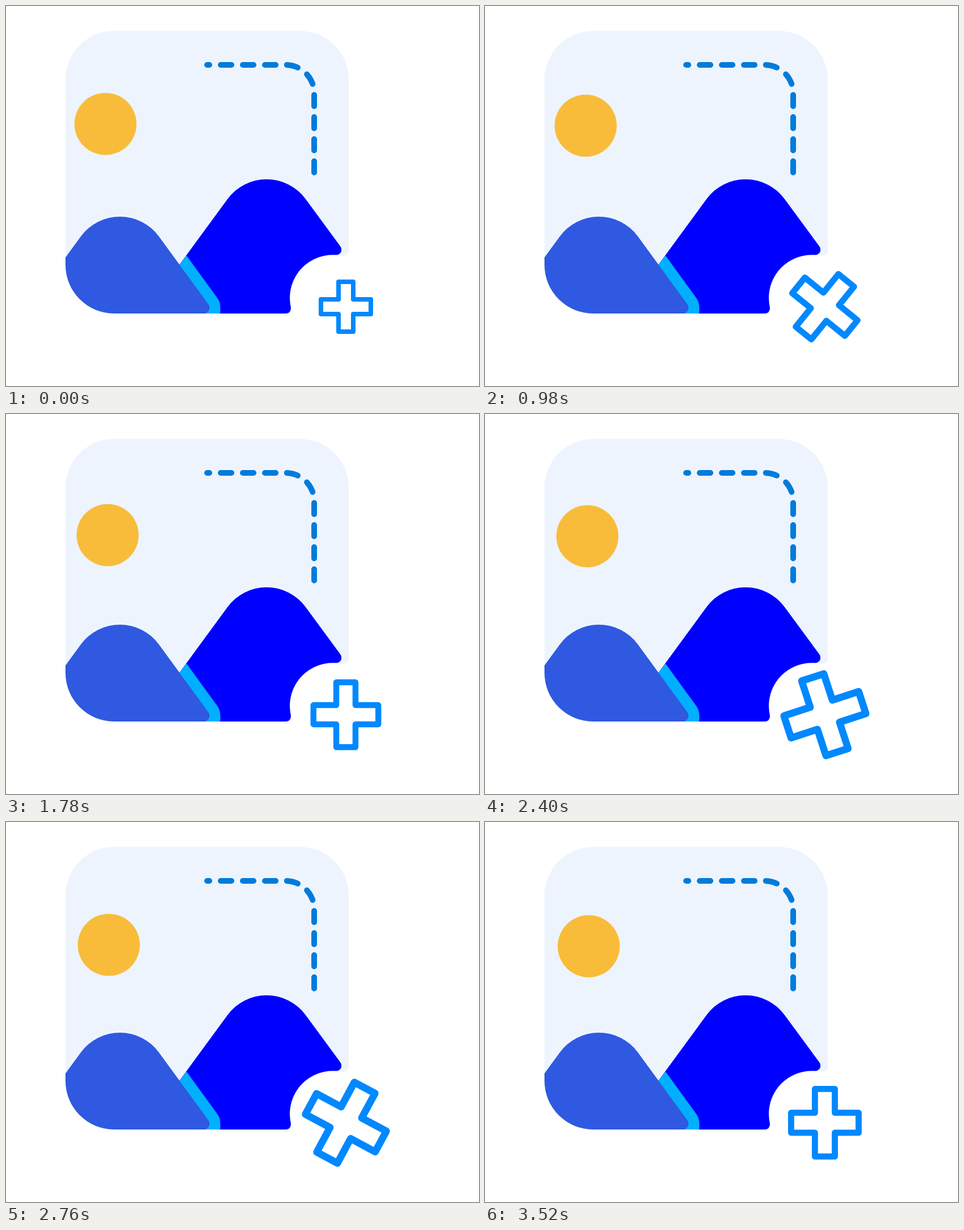
Animation, 835 px wide and 671 px high, one loop 3.6 s. Source, as an HTML page with a canvas:

```html
<!DOCTYPE html>
<html lang="en">
<head>
<meta charset="utf-8">
<title>Add picture</title>
<style>
html, body { margin: 0; width: 100%; height: 100%; overflow: hidden; background: #fff; }
canvas { display: block; }
</style>
</head>
<body>
<canvas id="stage" width="835" height="671"></canvas>
<script>
const ctx = document.getElementById('stage').getContext('2d');
const LOOP = 3600, LAST = 3520, STEP = 20;
const linear = u => u;
const sine = u => (1 - Math.cos(Math.PI * u)) / 2;

// [time, value] keys for the plus sign
const TURN = [[0, 0], [600, 87], [980, 129], [1400, 180], [1840, 180], [3240, 360]];
const SIZE = [[0, 1], [120, 1.03], [540, 0.66], [890, 1.365], [1400, 1.302],
  [1840, 1.302], [2600, 1.63], [3240, 1.354]];

function track(keys, t, ease) {
  for (let i = 1; i < keys.length; i++) {
    const [t0, a] = keys[i - 1], [t1, b] = keys[i];
    if (t <= t1) return a + (b - a) * ease((t - t0) / (t1 - t0));
  }
  return keys[keys.length - 1][1];
}

function fill(color, path) {
  ctx.fillStyle = color;
  ctx.fill(path);
}

const card = new Path2D(`M105 130A86 86 0 0 1 191 44H519A86 86 0 0 1 605 130V431
  Q605 441 595 441L577 439A76 76 0 0 0 501 515L503 533L493 543H191A86 86 0 0 1 105 457Z`);
const bigHill = new Path2D(`M306 457L391 341A85.5 85.5 0 0 1 529 341L590 424
  C595 431 591 440 582 439.5H577A76 76 0 0 0 501 515Q501 524 503 533
  Q503 543 493 543H340Z`);
const band = new Path2D('M306 457L318.5 440.5L374 517Q380 526 378 543H340Z');
const smallHill = new Path2D(`M105 444L132 407A85.5 85.5 0 0 1 270 407L357.5 527
  C362 534 357 543 349 543H191A86 86 0 0 1 105 457Z`);

function drawDashes() {
  ctx.strokeStyle = '#007bdb';
  ctx.lineWidth = 10;
  ctx.lineCap = 'round';
  ctx.beginPath();
  const line = (x0, y0, x1, y1) => { ctx.moveTo(x0, y0); ctx.lineTo(x1, y1); };
  const bend = (from, to) => {
    const a = from * Math.PI / 180;
    ctx.moveTo(494 + 50 * Math.cos(a), 154 + 50 * Math.sin(a));
    ctx.arc(494, 154, 50, a, to * Math.PI / 180);
  };
  line(355, 104, 359, 104);
  for (let i = 0; i < 3; i++) line(379 + 39 * i, 104, 398 + 39 * i, 104);
  bend(-88, -65);
  bend(-42, -19);
  for (let i = 0; i < 4; i++) line(544, 157 + 39 * i, 544, 177 + 39 * i);
  ctx.stroke();
}

function drawPlus(t) {
  const L = 44, w = 13;
  ctx.save();
  ctx.translate(600, 531);
  ctx.rotate(track(TURN, t, linear) * Math.PI / 180);
  const s = track(SIZE, t, sine);
  ctx.scale(s, s);
  ctx.beginPath();
  for (let i = 0; i < 4; i++) {
    ctx.lineTo(-w, -L);
    ctx.lineTo(w, -L);
    ctx.lineTo(w, -w);
    ctx.rotate(Math.PI / 2);
  }
  ctx.closePath();
  ctx.strokeStyle = '#0088ff';
  ctx.lineWidth = 8;
  ctx.lineJoin = 'round';
  ctx.stroke();
  ctx.restore();
}

function draw(now) {
  const t = Math.min(Math.floor((now % LOOP) / STEP) * STEP, LAST);
  ctx.fillStyle = '#fff';
  ctx.fillRect(0, 0, 835, 671);
  fill('#edf4fe', card);
  drawDashes();

  const drift = t / LAST;
  const sun = new Path2D();
  sun.arc(175.6 + 7.5 * drift, 208.2 + 11.2 * drift, 54.8, 0, 2 * Math.PI);
  fill('#f8bc3a', sun);

  fill('#0000ff', bigHill);
  fill('#00b0ff', band);
  fill('#2f59e0', smallHill);
  drawPlus(t);
}

let start;
function tick(now) {
  start ??= now;
  draw(Math.max(0, now - start));
  requestAnimationFrame(tick);
}
draw(0);
requestAnimationFrame(tick);
</script>
</body>
</html>
```
